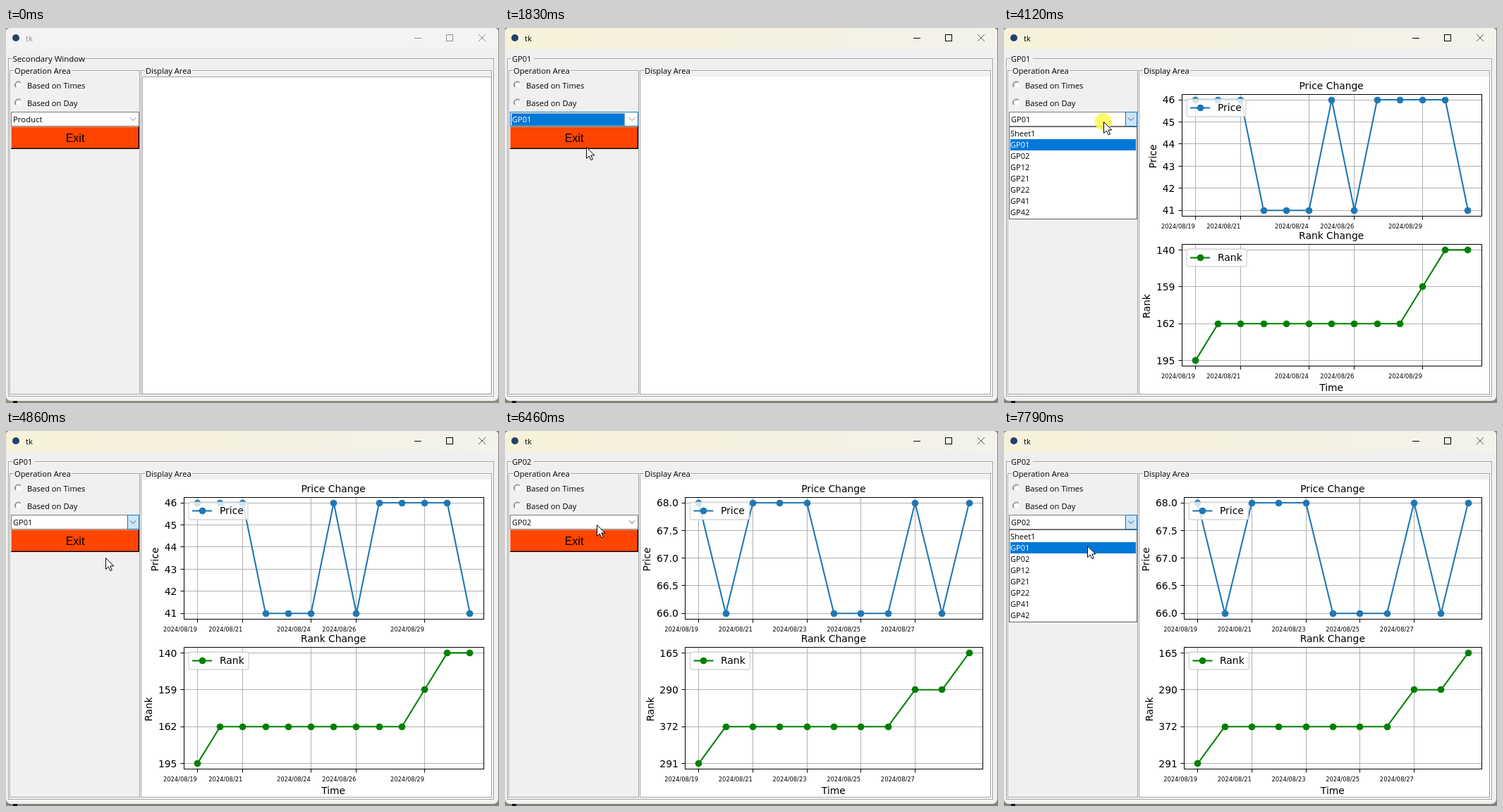
An HTML page for the animation above (8000 ms loop, 699x533 px).

```html
<!DOCTYPE html>
<html lang="en">
<head>
<meta charset="utf-8">
<title>tk</title>
<style>
html, body { margin: 0; width: 100%; height: 100%; overflow: hidden; background: #8d8a7d; }
svg { display: block; width: 699px; height: 533px; }
.ui { font: 11.2px "Open Sans", "Noto Sans", sans-serif; }
.plot { font: 13.89px "DejaVu Sans", sans-serif; }
.exit { font: 16px "Liberation Sans", Arial, sans-serif; text-anchor: middle; }
.date { font-size: 8.33px; text-anchor: end; }
.mid { text-anchor: middle; }
.end { text-anchor: end; }
.line { fill: none; stroke-width: 1; }

/* Percentages are ms / 80 */
.k { animation: 8s step-end infinite; }
@keyframes outside { 0% { fill: #918f7e } 11% { fill: #86817a } }
@keyframes tint { 0%, 11% { opacity: 0 } 12.625% { opacity: .3 } 18.6%, 100% { opacity: 1 } }
@keyframes caption { 0% { color: #8f8f8f } 11% { color: #000 } }
@keyframes close { 0% { color: #8a8a8a } 11% { color: #000 } 16.5% { color: #5c5c5c } }
@keyframes first { 0% { opacity: 1 } 22.875% { opacity: 0 } }
@keyframes second { 0%, 61.5% { opacity: 0 } 22.875% { opacity: 1 } }
@keyframes third { 0% { opacity: 0 } 61.5% { opacity: 1 } }
@keyframes plotA { 0%, 61.5% { opacity: 0 } 23.75% { opacity: 1 } }
@keyframes plotB { 0% { opacity: 0 } 62.375% { opacity: 1 } }
@keyframes picked { 0%, 23.75%, 62.375% { opacity: 0 } 22.875%, 61.5% { opacity: 1 } }
@keyframes pressed { 0%, 22.875%, 61.5% { opacity: 0 } 11%, 51.5%, 92.375% { opacity: 1 } }
@keyframes chevron {
  0%, 22.875%, 61.5% { stroke: #927a58 }
  7.6%, 28.8%, 80% { stroke: #555 }
}
@keyframes list { 0%, 22%, 60.75% { opacity: 0 } 11.875%, 51.5%, 92.375% { opacity: 1 } }
@keyframes row0 { 0%, 53.9%, 95% { opacity: 1 } 17.5%, 54.6%, 96.6% { opacity: 0 } }
@keyframes row1 { 0%, 55.2% { opacity: 0 } 17.5%, 54.6%, 96.6% { opacity: 1 } 53.9% { opacity: 0 } }
@keyframes row2 { 0%, 95% { opacity: 0 } 55.2% { opacity: 1 } }
@keyframes halo {
  0%, 13.5%, 22%, 53.125%, 60.75%, 94% { opacity: 0 }
  10.125%, 20.375%, 51.5%, 59.875%, 92.375% { opacity: 1 }
}
@keyframes enter { 0% { opacity: 0 } 3.25% { opacity: 1 } }
@keyframes move {
  0%, 3.25% { transform: translate(250px, 297px) }
  7.625%, 14% { transform: translate(120px, 128px) }
  18.625%, 24.8% { transform: translate(115px, 169px) }
  28.875% { transform: translate(142px, 128px) }
  29.75%, 53% { transform: translate(141px, 133px) }
  55.75%, 73.3% { transform: translate(141px, 180px) }
  76.5%, 77.6% { transform: translate(129px, 140px) }
  79.5% { transform: translate(130px, 127px) }
  80.75%, 93.8% { transform: translate(130px, 133px) }
  97.375%, 100% { transform: translate(118px, 163px) }
}
#pointer { animation: move 8s ease-in-out infinite; }
</style>
</head>
<body>
<svg viewBox="0 0 699 533" xmlns="http://www.w3.org/2000/svg">
  <defs>
    <linearGradient id="mica">
      <stop offset="0" stop-color="#f6f2da"/>
      <stop offset=".45" stop-color="#f5f1df"/>
      <stop offset="1" stop-color="#f3f3ec"/>
    </linearGradient>
  </defs>

  <rect class="k" style="animation-name:outside" width="699" height="533"/>
  <rect x="10" y="529" width="6" height="4" fill="#180c20"/>
  <rect width="698" height="530" rx="7" fill="#f0f0f0"/>

  <g class="ui">
    <path d="M0 30V6Q0 0 6 0H692Q698 0 698 6V30Z" fill="#f3f3f3"/>
    <path d="M0 30V6Q0 0 6 0H692Q698 0 698 6V30Z" fill="url(#mica)" style="animation:tint 8s linear infinite"/>
    <circle cx="14" cy="14" r="5" fill="#24406e"/>
    <g class="k" style="animation-name:caption">
      <text x="28" y="19" fill="currentColor">tk</text>
      <path class="line" stroke="currentColor" d="M579 14.5h10"/>
      <rect class="line" stroke="currentColor" x="624.5" y="9.5" width="9" height="9"/>
    </g>
    <path class="k line" style="animation-name:close" stroke="currentColor" d="M670 9l10 10m0-10l-10 10"/>

    <g id="frames"></g>
    <path fill="#f0f0f0" d="M11 59h82v4h-82zM197 59h67v4h-67z"/>
    <text x="12" y="65">Operation Area</text>
    <text x="198" y="65">Display Area</text>

    <g class="k" style="animation-name:first">
      <path fill="#f0f0f0" d="M9 42h104v4h-104z"/>
      <text x="9.5" y="48" font-size="11.5">Secondary Window</text>
    </g>
    <g class="k" style="animation-name:second">
      <path fill="#f0f0f0" d="M9 42h32v4h-32z"/>
      <text x="10" y="48" font-size="11">GP01</text>
    </g>
    <g class="k" style="animation-name:third">
      <path fill="#f0f0f0" d="M9 42h32v4h-32z"/>
      <text x="10" y="48" font-size="11">GP02</text>
    </g>

    <g id="radios"></g>
    <text x="30" y="86">Based on Times</text>
    <text x="30" y="111">Based on Day</text>

    <rect x="193" y="69" width="495" height="451" fill="#fff"/>
    <g class="k" style="animation-name:first">
      <path class="line" stroke="#a0a0a0" d="M193.5 520V69.5H688"/>
      <path class="line" stroke="#e3e3e3" d="M194 519.5H687.5V70"/>
    </g>

    <rect x="7" y="140" width="182" height="32" fill="#000"/>
    <path fill="#ffa27f" d="M7 140h181v1h-180v30h-1z"/>
    <rect x="8" y="141" width="180" height="30" fill="#992900"/>
    <rect x="8" y="141" width="179" height="29" fill="#ff4500"/>
    <text class="exit" x="98" y="162">Exit</text>

    <rect x="7.5" y="119.5" width="181" height="20" fill="#fff" stroke="#7a7a7a"/>
    <g class="k" style="animation-name:pressed">
      <rect x="172.5" y="119.5" width="16" height="20" fill="#cce4f7" stroke="#0f78c8"/>
    </g>
    <path class="k line" style="animation-name:chevron" d="M176 127.5l4 4 4-4"/>
    <text class="k" style="animation-name:first" x="10" y="134" font-size="11.4">Product</text>
    <text class="k" style="animation-name:second" x="10" y="134" font-size="11">GP01</text>
    <text class="k" style="animation-name:third" x="10" y="134" font-size="11">GP02</text>
    <g class="k" style="animation-name:picked">
      <rect class="line" x="7.5" y="119.5" width="181" height="20" stroke="#0078d7"/>
      <rect x="9" y="121" width="161" height="18" fill="#0078d7"/>
      <rect class="line" x="9.5" y="121.5" width="160" height="17" stroke="#ffb36b" stroke-dasharray="1 1"/>
      <g fill="#fff" font-size="11">
        <text class="k" style="animation-name:second" x="10" y="134">GP01</text>
        <text class="k" style="animation-name:third" x="10" y="134">GP02</text>
      </g>
    </g>

    <g id="list" class="k" style="animation-name:list" font-size="11">
      <rect x="7.5" y="140.5" width="181" height="131" fill="#fff" stroke="#646464"/>
    </g>
  </g>

  <g id="plotA" class="plot k" style="animation-name:plotA"></g>
  <g id="plotB" class="plot k" style="animation-name:plotB"></g>

  <g class="k" style="animation-name:enter">
    <g id="pointer">
      <circle class="k" style="animation-name:halo" cx="-.5" r="12" fill="#fffa50" fill-opacity=".85"/>
      <path d="M.5 .5V16.5L4.2 13L6.9 18.7L9.3 17.6L6.8 12H11.8Z" fill="#fff" stroke="#000"/>
    </g>
  </g>
</svg>

<script>
const $ = id => document.getElementById(id);

function add(parent, tag, attrs, text) {
  const node = document.createElementNS("http://www.w3.org/2000/svg", tag);
  for (const key in attrs) node.setAttribute(key, attrs[key]);
  if (text !== undefined) node.textContent = text;
  parent.appendChild(node);
  return node;
}

const line = (parent, d, stroke, width = 1) =>
  add(parent, "path", { d, stroke, fill: "none", "stroke-width": width, "stroke-linejoin": "round" });

const snap = v => Math.floor(v) + 0.5;

function groove(x, y, right, bottom) {
  for (const [shift, stroke] of [[1, "#fff"], [0, "#a0a0a0"]]) {
    add($("frames"), "rect", {
      x: x + shift, y: y + shift, width: right - x, height: bottom - y, fill: "none", stroke
    });
  }
}

function radio(y) {
  const g = add($("radios"), "g", { transform: `translate(17.5 ${y})` });
  add(g, "circle", { r: 5.5, fill: "#fff" });
  line(g, "M-3.7 3.7A5.2 5.2 0 0 1 3.7 -3.7", "#a0a0a0");
  line(g, "M-3 3A4.2 4.2 0 0 1 3 -3", "#696969");
  line(g, "M-3 3A4.2 4.2 0 0 0 3 -3", "#e3e3e3");
}

function listRows() {
  const names = ["Sheet1", "GP01", "GP02", "GP12", "GP21", "GP22", "GP41", "GP42"];
  names.forEach((name, i) => {
    const y = 142 + 16 * i;
    add($("list"), "text", { x: 9, y: y + 12 }, name);
    if (i > 2) return;
    const bar = add($("list"), "g", { class: "k", style: `animation-name:row${i}` });
    add(bar, "rect", { x: 9, y, width: 178, height: 16, fill: "#0078d7" });
    add(bar, "text", { x: 9, y: y + 12, fill: "#fff" }, name);
  });
}

// Levels are digits indexing into the tick labels, counted from the bottom.
// Curves keep fractional positions; rules, spines and markers sit on whole pixels.
function axes(g, { left, top, name, color, labels, levels, days, step, labelX, legendW }) {
  const right = 677.2, bottom = top + 173, width = right - left;
  const x0 = snap(left), x1 = snap(right), y0 = snap(top), y1 = snap(bottom);
  const px = i => left + width / 22 + i * width / 1.1 / (levels.length - 1);
  const py = v => bottom - 7.9 - v * 157.2 / (labels.length - 1);
  const centre = (left + right) / 2 - 0.5;

  step.forEach((at, i) => {
    const x = snap(px(at));
    line(g, `M${x} ${y0}V${y1}`, "#b0b0b0");
    line(g, `M${x} ${y1}v5`, "#000");
    add(g, "text", { class: "date", x: px(at) - 0.5, y: Math.round(y1 + 17) }, "2024/08/" + days[i]);
  });
  labels.forEach((label, v) => {
    const y = snap(py(v));
    line(g, `M${x0} ${y}H${x1}`, "#b0b0b0");
    line(g, `M${x0} ${y}h-5`, "#000");
    add(g, "text", { class: "end", x: left - 9.7, y: Math.round(py(v) + 5.2) }, label);
  });

  const pts = [...levels].map((v, i) => [px(i), py(+v)]);
  line(g, "M" + pts.join("L"), color, 2.08);
  for (const [x, y] of pts) add(g, "circle", { cx: snap(x), cy: snap(y), r: 4.86, fill: color });
  add(g, "rect", { x: x0, y: y0, width: x1 - x0, height: y1 - y0, fill: "none", stroke: "#000" });

  add(g, "text", { class: "mid", x: centre, y: Math.round(top - 7.3) }, name + " Change");
  add(g, "text", { class: "mid", transform: `translate(${labelX} ${y0 + 88})rotate(-90)` }, name);

  const lx = left + 6.94, ly = y0 + 6.5;
  add(g, "rect", {
    x: lx, y: ly, width: legendW, height: 25, rx: 2.8,
    fill: "#fff", "fill-opacity": 0.8, stroke: "#ccc", "stroke-opacity": 0.8, "stroke-width": 1.39
  });
  line(g, `M${lx + 5} ${ly + 12.5}h28`, color, 2.08);
  add(g, "circle", { cx: snap(lx + 19), cy: ly + 12.5, r: 4.86, fill: color });
  add(g, "text", { x: Math.floor(lx + 44), y: ly + 17 }, name);
  return centre;
}

function figure(id, shared, price, rank) {
  const g = $(id);
  axes(g, { ...shared, ...price, top: 94.1, name: "Price", color: "#1f77b4", legendW: 84 });
  const x = axes(g, { ...shared, ...rank, top: 307.5, name: "Rank", color: "#008000", legendW: 85 });
  add(g, "text", { class: "mid", x, y: 516 }, "Time");
}

groove(3.5, 43.5, 691.5, 523.5);
groove(5.5, 60.5, 189.5, 520.5);
groove(191.5, 60.5, 688.5, 520.5);
radio(81);
radio(106);
listRows();

figure("plotA",
  { left: 252.1, step: [0, 2, 5, 7, 10], days: [19, 21, 24, 26, 29] },
  { labels: ["41", "42", "43", "44", "45", "46"], levels: "5550005055550", labelX: 216 },
  { labels: ["195", "162", "159", "140"], levels: "0111111111233", labelX: 207 });
figure("plotB",
  { left: 255.5, step: [0, 2, 4, 6, 8], days: [19, 21, 23, 25, 27] },
  { labels: ["66.0", "66.5", "67.0", "67.5", "68.0"], levels: "40444000404", labelX: 206 },
  { labels: ["291", "372", "290", "165"], levels: "01111111223", labelX: 211 });
</script>
</body>
</html>
```
